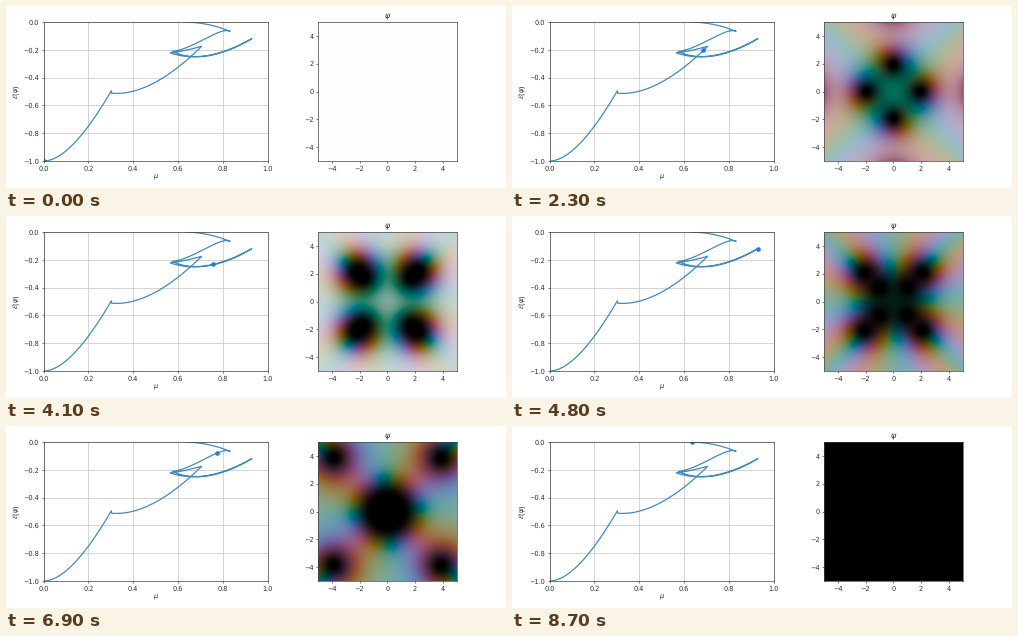
Write a matplotlib script that moves like this. It is 500 px wide and 182 px high and loops after 8.8 s.

```python
from math import comb

import numpy as np
import matplotlib.pyplot as plt
from matplotlib.animation import FuncAnimation

W, H, DPI = 500, 182, 100
FRAMES, STEP = 88, 100
K = 0.47  # scale of the default matplotlib style

plt.rcParams.update({
    "font.family": "DejaVu Sans", "font.size": 10 * K,
    "text.hinting": "none", "text.color": "#1c1c1c",
    "axes.linewidth": 0.5, "axes.edgecolor": "#404040",
    "grid.linewidth": 0.5, "grid.color": "#c4c4c4",
    "xtick.major.size": 3.5 * K, "ytick.major.size": 3.5 * K,
    "xtick.major.width": 0.45, "ytick.major.width": 0.45,
    "xtick.major.pad": 3.5 * K, "ytick.major.pad": 3.5 * K,
    "xtick.color": "#303030", "ytick.color": "#303030",
})

# Solution branches between folds: last step, Bezier points (mu, energy)
BRANCHES = [
    (11, [(0, -1), (.12, -1), (.303, -.495)]),
    (23.5, [(.29, -.51), (.47, -.55), (.706, -.175)]),
    (32, [(.706, -.175), (.62, -.213), (.565, -.222)]),
    (48, [(.565, -.222), (.72, -.31), (.93, -.12)]),
    (61, [(.93, -.12), (.72, -.32), (.575, -.212)]),
    (72.5, [(.575, -.212), (.67, -.195), (.79, -.03), (.833, -.067)]),
    (87, [(.833, -.067), (.74, -.005), (.635, 0)]),
]

axis = np.linspace(-5, 5, 140)
X, Y = np.meshgrid(axis, axis)
Z = X + 1j * Y
Z4 = Z ** 4


def bezier(points, t):
    n = len(points) - 1
    return sum(comb(n, k) * (1 - t) ** (n - k) * t ** k * np.array(p)
               for k, p in enumerate(points))


def state(i):
    start = 0
    for end, points in BRANCHES:
        if i <= end:
            return bezier(points, (i - start) / (end - start))
        start = end


def vortex_rings(i):
    """Two rings drift in, meet on the axes, turn to the diagonals and split."""
    steps = (23, 29, 35.5, 48, 57, 69)
    entry = 25 * np.exp(-i / 6)
    inner = np.interp(i, steps, (1.4, 3.1, 3.2, 1.41, 1.27, 0)) + entry
    outer = np.interp(i, steps, (5.8, 3.2, 3.2, 2.97, 3.75, 5.5)) + entry
    turn = np.pi / 4 * np.interp(i, (29, 35.5), (0, 1))
    return (inner, turn), (outer, -turn)


def order_parameter(i):
    mu, energy = state(i)
    core = np.interp(i, (57, 69), (2.4, 3.6))
    phase, size, inside = 0, np.ones_like(X), 0
    for r, turn in vortex_rings(i):
        phase = phase + np.angle(r ** 4 - Z4 * np.exp(-4j * turn))
        inside += 4 * np.clip(6 - r, 0, 1)
        for k in range(4):
            d2 = np.abs(Z - r * np.exp(1j * turn) * 1j ** k) ** 2
            size *= np.sqrt(1 - np.exp(-d2 / core))
    # magnetic gauge bends the phase near the walls
    phase = phase - (mu / 2 - inside / 30) / 240 * Z4.imag
    # energy is minus the mean fourth power of the modulus
    size *= (max(-energy, 1e-6) / np.mean(size ** 4)) ** 0.25
    return np.clip(size, 0, 1), phase


def domain_colors(size, phase):
    """Phase as OKLab hue, modulus as lightness."""
    chroma = 0.1 * (1 - 2 * np.abs(size - 0.5)) ** 1.3
    hue = phase + np.radians(174)
    a, b = chroma * np.cos(hue), chroma * np.sin(hue)
    l = (size + 0.3963 * a + 0.2158 * b) ** 3
    m = (size - 0.1056 * a - 0.0639 * b) ** 3
    s = (size - 0.0895 * a - 1.2915 * b) ** 3
    lin = np.stack([
        4.0767 * l - 3.3077 * m + 0.2310 * s,
        -1.2684 * l + 2.6098 * m - 0.3413 * s,
        -0.0042 * l - 0.7034 * m + 1.7076 * s,
    ], axis=-1)
    lin = np.clip(lin, 0, 1)
    return np.clip(np.where(lin <= 0.0031308, 12.92 * lin,
                            1.055 * lin ** (1 / 2.4) - 0.055), 0, 1)


def add_axes(left, top, width, height):
    return fig.add_axes([left / W, 1 - (top + height) / H,
                         width / W, height / H])


def label(x, y, text, size=10, **kw):
    fig.text(x / W, 1 - y / H, text, fontsize=size * K,
             ha="center", va="center", **kw)


fig = plt.figure(figsize=(W / DPI, H / DPI), dpi=DPI, facecolor="white")

left = add_axes(37.5, 16, 224, 139)
path = np.array([state(i) for i in np.arange(0, 87.01, 0.5)])
left.plot(*path.T, color="#1f77b4", lw=0.9, alpha=0.85)
dot, = left.plot([], [], "o", color="#1f77e8", ms=2.8, mew=0.4)
left.set(xlim=(0, 1), ylim=(-1, 0))
left.grid(True)
label(149.5, 171, r"$\mu$")
label(10.5, 86, r"$\mathcal{E}(\psi)$", rotation=90)

right = add_axes(312, 16, 138.5, 139)
image = right.imshow(np.ones((140, 140, 3)), extent=(-5, 5, -5, 5),
                     origin="lower", aspect="auto", interpolation="bilinear")
right.set_xticks(range(-4, 5, 2))
right.set_yticks(range(-4, 5, 2))
label(381.3, 10.5, r"$\psi$", size=12)


def draw(i):
    mu, energy = state(i)
    dot.set_data([mu], [energy])
    image.set_data(domain_colors(*order_parameter(i)))
    return dot, image


anim = FuncAnimation(fig, draw, frames=FRAMES, interval=STEP,
                     init_func=lambda: draw(0), repeat=True, repeat_delay=0)
plt.show()
```
